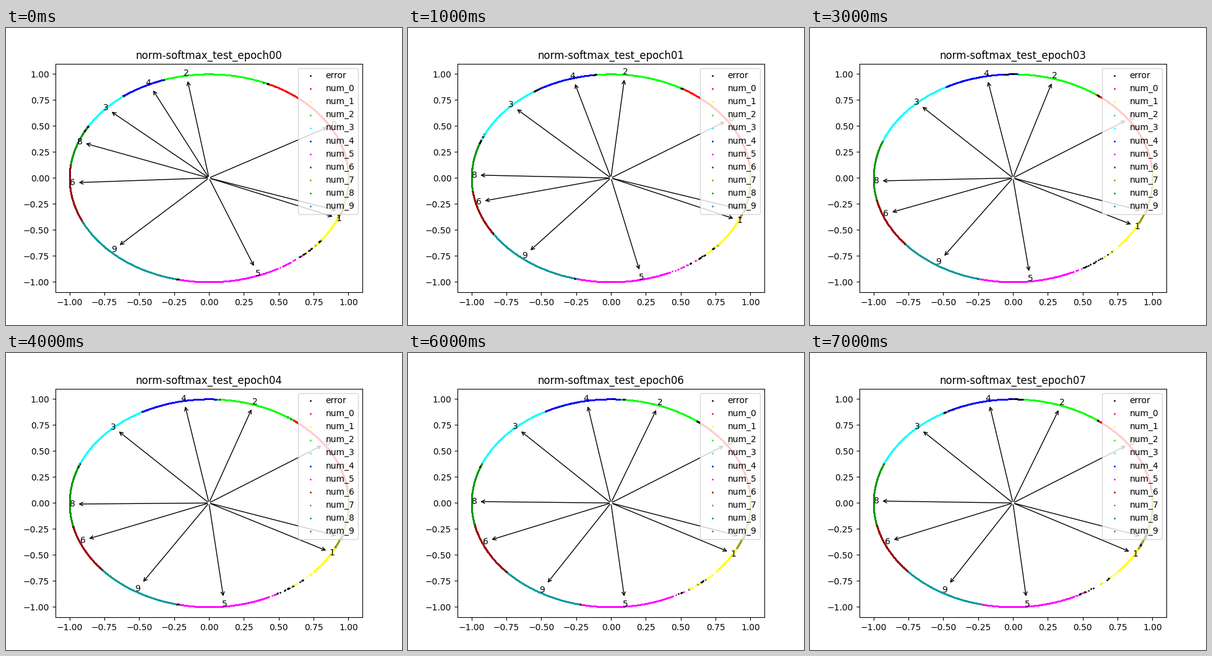
Write a matplotlib script that moves like this. It is 640 by 480 pixels and loops after 8000 ms.

```python
import numpy as np
import matplotlib.pyplot as plt
from matplotlib.animation import FuncAnimation

COLORS = ["#ff0000", "#ffff00", "#00ff00", "#00ffff", "#0000ff",
          "#ff00ff", "#990000", "#999900", "#009900", "#009999"]
EPOCHS = 8
ORDER = np.array([1, 7, 0, 2, 4, 3, 8, 6, 9, 5])  # counterclockwise

# Each class weight settles like a damped spring:
# first angle, last angle (degrees), decay rate, drag
SPRINGS = np.array([
    (29.2, 33.7, 1.0, -.6),
    (-24.4, -31.0, 1.0, 1.2),
    (100.6, 70.3, .85, .15),
    (139.4, 134.8, 1.2, .8),
    (117.0, 101.4, .97, 0),
    (289.3, 274.7, 1.0, .28),
    (184.0, 203.4, .8, 0),
    (-20.5, -20.8, 1.2, 12),
    (161.1, 179.9, .82, -.98),
    (225.4, 239.5, .8, .45),
])


def weight_angles(epoch):
    first, last, rate, drag = SPRINGS.T
    return last + (first - last) * (1 + drag * epoch) * np.exp(-rate * epoch)


def sample(epoch):
    """Return the angles of the test points and their class, -1 for errors."""
    rng = np.random.default_rng(epoch + 5)
    angle = np.arange(-90, 270, .22)
    angle = angle + rng.uniform(-.1, .1, angle.size)

    # Few points lie between classes 5 and 1
    sparse = (angle > -65) & (angle < -41)
    angle = angle[~sparse | (rng.random(angle.size) < .36)]

    # Neighbouring classes meet halfway between their weights
    weights = weight_angles(epoch)[ORDER]
    starts = (weights + np.roll(weights, 1)) / 2
    starts[0] -= 180
    label = ORDER[np.searchsorted(starts, angle) - 1]

    # Errors come in short runs near the borders, most of them between 5 and 1
    run = ((angle + 91) / .7).astype(int)
    chance = rng.random(run.max() + 1)[run]
    before = rng.exponential(1.3, starts.size)
    after = rng.exponential(1.3, starts.size)
    before[0], after[0] = 4, 12
    for start, b, a in zip(starts, before, after):
        label[(angle > start - b) & (angle < start + a) & (chance < .55)] = -1
    return angle, label


def unit(degrees):
    t = np.radians(degrees)
    return np.cos(t), np.sin(t)


def draw(epoch):
    ax.clear()
    angle, label = sample(epoch)
    for k in range(-1, 10):
        x, y = unit(angle[label == k])
        ax.scatter(x, y, s=1, color="black" if k < 0 else COLORS[k],
                   label="error" if k < 0 else f"num_{k}")
    for k, a in enumerate(weight_angles(epoch)):
        ax.annotate(str(k), xy=(0, 0), xytext=unit(a),
                    arrowprops=dict(arrowstyle="<-"))
    ax.set(xlim=(-1.1, 1.1), ylim=(-1.1, 1.1),
           title=f"norm-softmax_test_epoch{epoch:02d}")
    ax.legend(loc="upper right")
    return []


fig, ax = plt.subplots(figsize=(6.4, 4.8), dpi=100)
anim = FuncAnimation(fig, draw, frames=EPOCHS, init_func=lambda: [],
                     interval=1000, repeat=True, repeat_delay=0)
plt.show()
```
